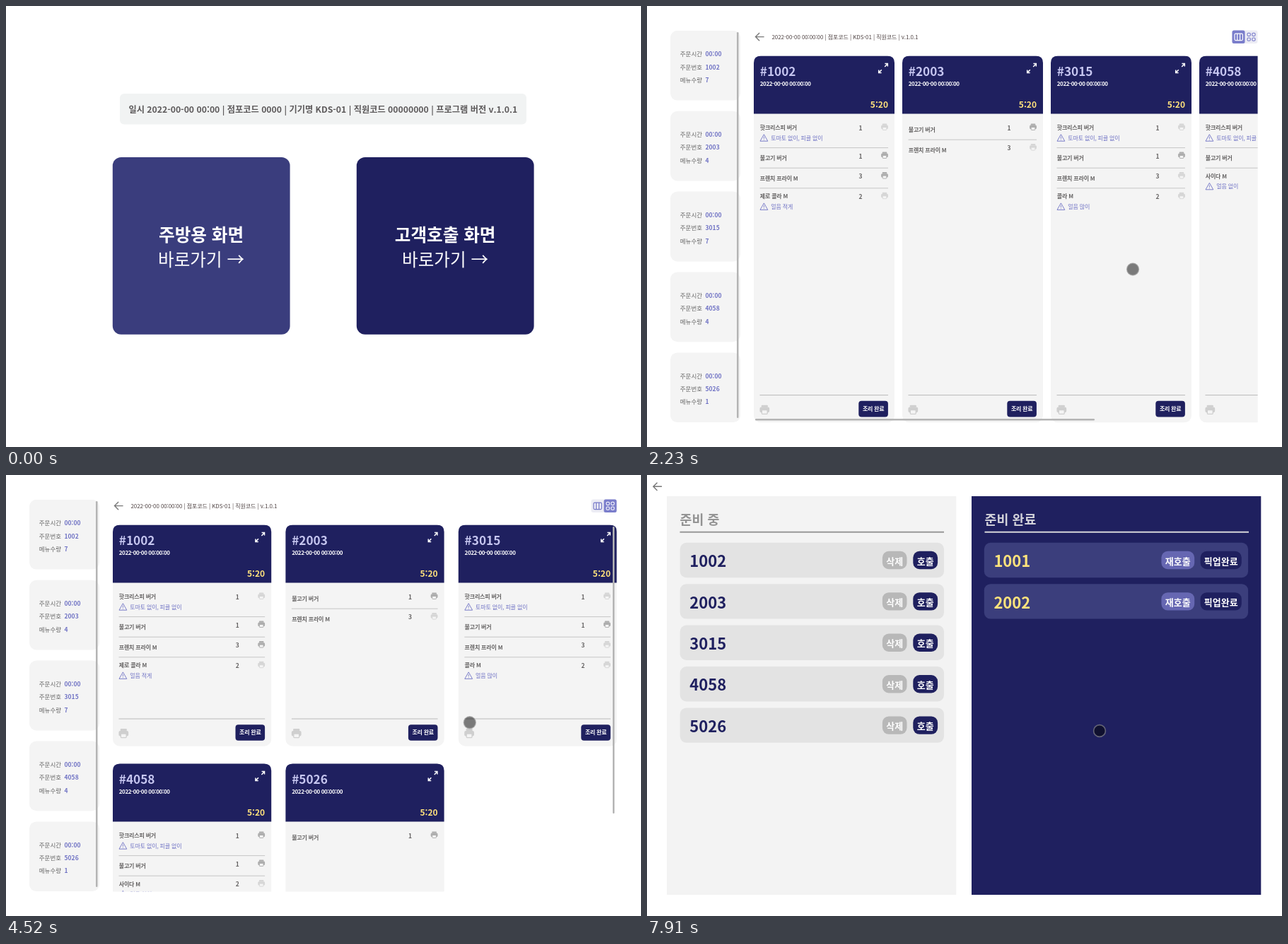
An HTML page that plays this animation: 898x624 px, repeating every 8000 ms.

```html
<!DOCTYPE html>
<html lang="ko">
<head>
<meta charset="utf-8">
<style>
html, body { margin: 0; width: 100%; height: 100%; overflow: hidden; background: #fff; }
svg { display: block; width: 898px; height: 624px; }
text { font-family: "Noto Sans CJK KR", "Noto Sans KR", "Noto Sans CJK", "Noto Sans CJK JP", sans-serif; }
</style>
</head>
<body>
<svg id="stage" viewBox="0 0 898 624" xmlns="http://www.w3.org/2000/svg"></svg>
<script>
const LOOP = 8000;
const NAVY = '#1f205f', INDIGO = '#3a3d7d', LILAC = '#6f72c4', PALE = '#f4f4f4', YELLOW = '#ffe27c';

// Drawing helpers; text is placed by its vertical middle.
const rect = (x, y, w, h, r, fill, more = '') =>
  `<rect x="${x}" y="${y}" width="${w}" height="${h}" rx="${r}" fill="${fill}" ${more}/>`;
const text = (x, mid, size, fill, str, weight = 400, more = '') =>
  `<text x="${x}" y="${mid + size * .385}" font-size="${size}" fill="${fill}" font-weight="${weight}" ${more}>${str}</text>`;
const stroke = (d, color, width, more = '') =>
  `<path d="${d}" fill="none" stroke="${color}" stroke-width="${width}" ${more}/>`;
const group = (id, body, more = '') => `<g id="${id}" ${more}>${body}</g>`;
const at = (x, y, body, scale = 1) => `<g transform="translate(${x} ${y}) scale(${scale})">${body}</g>`;
const MIDDLE = 'text-anchor="middle" ', END = 'text-anchor="end" ';
const tight = n => `letter-spacing="${-n}"`;

const backArrow = (x, y) => at(x, y,
  stroke('M13 0H1M6.5 -5.6L.9 0L6.5 5.6', '#777', 1.4));

const printer = (x, y, color, scale = 1) => at(x, y,
  rect(-3.3, -4.6, 6.6, 2.2, .8, color) +
  rect(-4.9, -2.5, 9.8, 5.4, 1.5, color) +
  rect(-2.8, .4, 5.6, 4, .6, PALE, `stroke="${color}" stroke-width=".9"`), scale);

const warning = (x, y) => at(x, y,
  stroke('M0 -4.9L5.4 4.6H-5.4Z', LILAC, .9, 'stroke-linejoin="round"') +
  stroke('M0 -1.8V1.4M0 2.4V3.3', LILAC, .8));

const expand = (x, y) => at(x, y,
  stroke('M2.2 -1.8L6 -5.8M2.4 -6.1H6.3V-2.2M-2.2 2.6L-6 6.4M-2.4 6.7H-6.3V2.8', '#fff', 1.5));

const DARK = '#adadad', LIGHT = '#d6d6d6';
const item = (name, qty, color, note) => ({ name, qty, color, note });
const spicy = color => item('핫크리스피 버거', 1, color, '토마토 없이, 피클 없이');
const bulgogi = item('불고기 버거', 1, DARK);
const fries = color => item('프렌치 프라이 M', 3, color);
const orders = [
  { no: 1002, count: 7, items: [spicy(LIGHT), bulgogi, fries(DARK), item('제로 콜라 M', 2, LIGHT, '얼음 적게')] },
  { no: 2003, count: 4, items: [bulgogi, fries(LIGHT)] },
  { no: 3015, count: 7, items: [spicy(LIGHT), bulgogi, fries(LIGHT), item('콜라 M', 2, LIGHT, '얼음 많이')] },
  { no: 4058, count: 4, items: [spicy(DARK), bulgogi, item('사이다 M', 2, LIGHT, '얼음 없이')] },
  { no: 5026, count: 1, items: [bulgogi] }
];

function orderCard(order, x, y, w, h) {
  const ink = '#656363';
  let out = rect(0, 0, w, h, 10, PALE) +
    `<path d="M0 82V10Q0 0 10 0H${w - 10}Q${w} 0 ${w} 10V82Z" fill="${NAVY}"/>` +
    text(8.8, 22.2, 17.2, '#c6c6f0', '#' + order.no, 700) +
    text(8.8, 39.7, 8, '#fff', '2022-00-00 00:00:00', 700, tight(.4)) +
    text(w - 9, 69.3, 12, YELLOW, '5:20', 700, END) +
    expand(w - 16, 17.3);
  let top = 90.2;
  order.items.forEach((it, i) => {
    if (i) out += stroke(`M8.5 ${top}H${w - 9}`, '#c6c6c6', 1);
    out += text(8.8, top + (it.note ? 11.5 : 14.3), 8, ink, it.name, 700, tight(.2)) +
      text(w - 48, top + 12, 8.5, ink, it.qty, 700, MIDDLE) +
      printer(w - 14, top + 10.5, it.color);
    if (it.note) out += warning(14.4, top + 26) + text(24.3, top + 26, 8, LILAC, it.note, 400, tight(.15));
    top += it.note ? 40 : 28.6;
  });
  out += stroke(`M8.5 ${h - 38.8}H${w - 9}`, '#b9b9b9', 1) +
    printer(15.3, h - 18.3, '#cfcfcf', 1.4) +
    rect(w - 50.7, h - 30.6, 41.6, 22.6, 4, NAVY) +
    text(w - 29.9, h - 19.4, 8, '#fff', '조리 완료', 700, MIDDLE + tight(.25));
  return at(x, y, out);
}

function homeScreen() {
  const tile = (x, fill, title) => rect(x, 214, 250.8, 250.8, 12, fill) +
    text(x + 125.3, 323.3, 24.6, '#fff', title, 700, MIDDLE) +
    text(x + 125.3, 358.2, 24.6, '#fff', '바로가기 →', 400, MIDDLE);
  return rect(161, 124, 575, 43.4, 6, '#f1f3f3') +
    text(448.3, 146, 12.23, '#5d5a5b',
      '일시 2022-00-00 00:00 | 점포코드 0000 | 기기명 KDS-01 | 직원코드 00000000 | 프로그램 버전 v.1.0.1', 700, MIDDLE) +
    tile(150.8, INDIGO, '주방용 화면') + tile(495.8, NAVY, '고객호출 화면');
}

function sidebar() {
  return orders.map((o, i) => at(33, 34.8 + i * 113.9,
    rect(0, 0, 99, 98.8, 10, PALE) +
    [['주문시간', '00:00'], ['주문번호', o.no], ['메뉴수량', o.count]].map(([label, value], k) =>
      text(13.8, 33.2 + k * 18.3, 8.5, '#666', label) +
      text(49.6, 33.2 + k * 18.3, 8.5, LILAC, value, 700)).join(''))).join('');
}

function viewSwitch(grid) {
  const on = '#7a7dcb', ink = active => active ? '#fff' : '#7477c8';
  const dot = (x, y) => rect(x, y, 4.3, 4.3, 1.5, 'none', `stroke="${ink(grid)}" stroke-width="1.1"`);
  return rect(827.5, 34.5, 36, 18.5, 3, '#ececf4') +
    rect(grid ? 845.5 : 827.5, 34.5, 18, 18.5, 2.5, on) +
    rect(831, 39.2, 11.4, 9.4, 1.5, 'none', `stroke="${ink(!grid)}" stroke-width="1.2"`) +
    stroke('M834.8 39V48.6M838.6 39V48.6', ink(!grid), 1.2) +
    dot(849, 38.2) + dot(855.8, 38.2) + dot(849, 45) + dot(855.8, 45);
}

function kitchenScreen() {
  const list = orders.map((o, i) => orderCard(o, 151 + i * 210, 70.4, 199, 519)).join('');
  const grid = orders.map((o, i) =>
    orderCard(o, 151 + i % 3 * 244.4, 70.4 + (i / 3 | 0) * 338, 224.2, 313.4)).join('');
  const bar = (id, x, y, w, h) => rect(x, y, w, h, 1.2, '#b4b4b4', `id="${id}"`);
  return `<g clip-path="url(#sideClip)">${group('side', sidebar())}</g>` +
    bar('sideBar', 127, 37, 2.5, 546) +
    backArrow(152.6, 43.6) +
    text(176.5, 44.2, 8, '#504444', '2022-00-00 00:00:00 | 점포코드 | KDS-01 | 직원코드 | v.1.0.1', 500, tight(.085)) +
    group('listView', viewSwitch(false) +
      `<g clip-path="url(#mainClip)">${group('list', list)}</g>` + bar('listBar', 153, 584, 480, 2.5)) +
    group('gridView', viewSwitch(true) +
      `<g clip-path="url(#mainClip)">${group('grid', grid)}</g>` + bar('gridBar', 858, 73, 2.5, 406));
}

function callScreen() {
  const button = (x, y, w, fill, label) => rect(x, y + 12, w, 25.4, 9, fill) +
    text(x + w / 2, y + 25.7, 13, '#fff', label, 700, MIDDLE);
  const panel = (x, fill, title, ink, line) => rect(x, 30, 409.3, 564, 0, fill) +
    text(x + 18.6, 62.9, 18.4, ink, title, 700) + stroke(`M${x + 18.5} 80.7H${x + 392}`, line, 2);
  const row = (x, i, fill, ink, no, buttons) => {
    const y = 95.8 + i * 58.4;
    return rect(x, y, 373.3, 49.4, 9, fill) + text(x + 13.6, y + 26, 22, ink, no, 700) +
      buttons.map(([dx, w, color, label]) => button(x + dx, y, w, color, label)).join('');
  };
  return backArrow(8, 16.3) +
    panel(28, '#f3f3f3', '준비 중', '#929292', '#989898') +
    panel(459, NAVY, '준비 완료', '#d2d2da', '#d6d6da') +
    orders.map((o, i) => row(46.7, i, '#e3e3e3', NAVY, o.no,
      [[286.2, 34.6, '#b8b8b8', '삭제'], [329.6, 34.8, NAVY, '호출']])).join('') +
    [1001, 2002].map((no, i) => row(476.8, i, '#3b3e7c', YELLOW, no,
      [[250.6, 46.8, '#6667b2', '재호출'], [305.8, 58.2, NAVY, '픽업완료']])).join('');
}

const stage = document.getElementById('stage');
stage.innerHTML =
  `<defs><clipPath id="sideClip">${rect(30, 34.6, 110, 555, 0, '#000')}</clipPath>` +
  `<clipPath id="mainClip">${rect(151, 70.4, 712.6, 519, 0, '#000')}</clipPath></defs>` +
  rect(0, 0, 898, 624, 0, '#fff') +
  group('home', homeScreen()) + group('kitchen', kitchenScreen()) + group('call', callScreen()) +
  '<circle id="pointer" r="8.4" stroke-width="1.6"/>';
const $ = id => document.getElementById(id);

// Pointer stops: time, x, y
const path = [
  [60, 340, 632], [390, 292, 400], [850, 292, 400], [1090, 649, 430], [1120, 649, 432],
  [1480, 335, 433], [1610, 323, 433], [1670, 323, 433], [2150, 650, 430], [2460, 869, 90],
  [2600, 873, 36], [2780, 854, 44], [3260, 854, 44], [3470, 694, 375], [3560, 690, 346],
  [3980, 687, 213], [4120, 687, 213], [4180, 687, 231], [4440, 688, 347], [4980, 158, 400],
  [5260, 93, 330], [5440, 92, 302], [5500, 92, 302], [5800, 95, 493], [5880, 95, 493],
  [6480, 181, 28], [6650, 162, 44], [7050, 162, 44], [7360, 645, 337], [7860, 645, 337],
  [7910, 640, 362]
];
const presses = [[400, 520], [1110, 1640], [1640, 2160], [2900, 3100], [3540, 4450], [5290, 5800], [6660, 6780], [7390, 7510]];

function pointerAt(t) {
  const k = path.findIndex(p => p[0] > t);
  if (k < 0) return path[path.length - 1].slice(1);
  if (k === 0) return path[0].slice(1);
  const a = path[k - 1], b = path[k];
  const u = (t - a[0]) / (b[0] - a[0]), e = u * u * (3 - 2 * u);
  return [a[1] + (b[1] - a[1]) * e, a[2] + (b[2] - a[2]) * e];
}

const within = (t, a, b) => t >= a && t < b;
const clamp = (v, max) => Math.max(0, Math.min(max, v));
const show = (id, on) => $(id).setAttribute('display', on ? 'inline' : 'none');
const move = (id, x, y) => $(id).setAttribute('transform', `translate(${x} ${y})`);

function render(t) {
  const [x, y] = pointerAt(t);
  const kitchen = within(t, 590, 6840), call = t >= 7580;
  show('home', !kitchen && !call);
  show('kitchen', kitchen);
  show('call', call);
  show('listView', t < 3170);
  show('gridView', t >= 3170);
  show('gridBar', t < 4700);
  show('sideBar', t < 5840);

  // Content follows the pointer while it is dragged.
  const listScroll = within(t, 1110, 2160) ? clamp(649 - x, 326) : 0;
  const gridScroll = within(t, 3540, 4450) ? clamp(346.5 - y, 133) : 0;
  const sideScroll = within(t, 5290, 5800) ? clamp(330 - y, 4) : 0;
  move('list', -listScroll, 0);
  move('listBar', listScroll * .673, 0);
  move('grid', 0, -gridScroll);
  move('gridBar', 0, gridScroll * .796);
  move('side', 0, -sideScroll);
  move('sideBar', 0, sideScroll);

  const pressed = presses.some(([a, b]) => within(t, a, b));
  const pointer = $('pointer');
  show('pointer', t >= 70);
  move('pointer', x, y);
  pointer.setAttribute('fill', pressed ? 'rgba(190,184,45,.86)' : 'rgba(0,0,0,.5)');
  pointer.setAttribute('stroke', pressed ? 'rgba(222,216,100,.9)' : 'rgba(150,150,150,.6)');
}

const start = performance.now();
function frame() {
  render((performance.now() - start) % LOOP);
  requestAnimationFrame(frame);
}
render(0);
requestAnimationFrame(frame);
</script>
</body>
</html>
```
